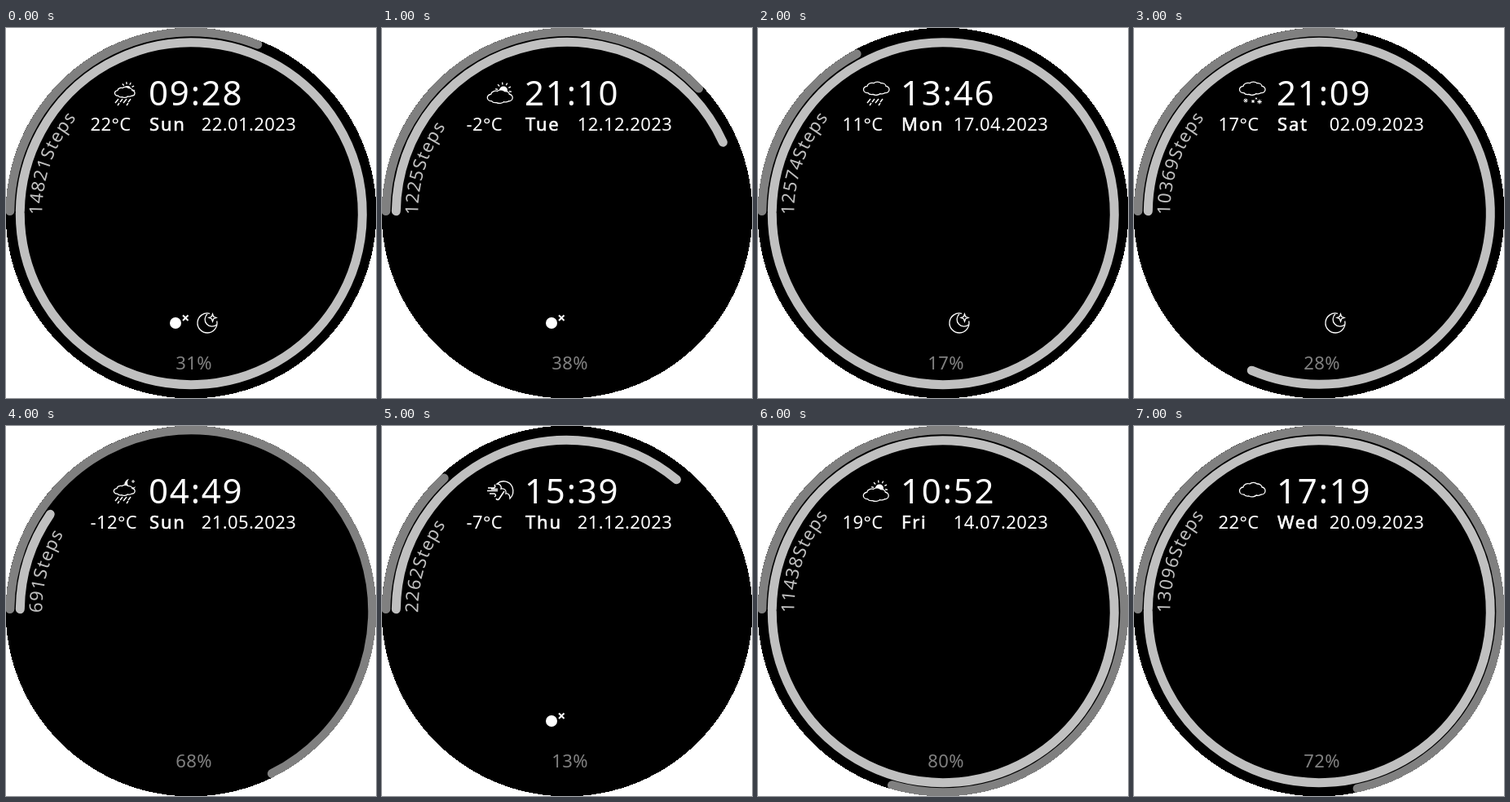
An HTML page that plays this animation: 454x454 px, repeating every 8000 ms.

```html
<!DOCTYPE html>
<html lang="en">
<head>
<meta charset="utf-8">
<title>Watch face</title>
<style>
  html, body { margin: 0; width: 100%; height: 100%; overflow: hidden; background: #fff; }
  svg { display: block; width: 454px; height: 454px; }
  text { font: 22px "Noto Sans", "Open Sans", sans-serif; fill: #fff; letter-spacing: .4px; white-space: pre; }
  #time { font-size: 42px; letter-spacing: 1.8px; }
  #day { letter-spacing: 1.8px; stroke: #fff; stroke-width: .6; }
  #steps { fill: #c0c0c0; letter-spacing: 1px; }
  #charge { fill: #808080; }
  .ring { fill: none; stroke-width: 11; stroke-linecap: round; }
  .icon { fill: none; stroke: #fff; stroke-width: 1.3; }
  .solid { fill: #fff; stroke: none; }
  .mask { fill: #000; }
</style>
</head>
<body>
<svg viewBox="0 0 454 454">
  <defs>
    <path id="curve"/>
    <path id="cloud" d="M135 84a5 4.5 0 0 1-1-9a6 5 0 0 1 8-4a6 5 0 0 1 9 0a6 4 0 0 1 6 4a4.5 4.5 0 0 1-1 9a5 3 0 0 1-6 1a6 4 0 0 1-9 1a5 3 0 0 1-6-2z" vector-effect="non-scaling-stroke"/>
  </defs>
  <rect width="454" height="454"/>
  <path id="outer" class="ring" stroke="#808080"/>
  <path id="inner" class="ring" stroke="#c0c0c0"/>
  <path id="corners" fill="#fff" fill-rule="evenodd" shape-rendering="crispEdges"
    d="M-2-2H456V456H-2zM-.5 227a227.5 227.5 0 0 1 455 0a227.5 227.5 0 0 1-455 0z"/>
  <g id="weather" class="icon"></g>
  <text id="time" x="175" y="95"></text>
  <text id="temp" x="103.5" y="126"></text>
  <text id="day" x="176" y="126"></text>
  <text id="date" x="239.7" y="126"></text>
  <text id="steps"><textPath id="count" href="#curve"></textPath></text>
  <g id="link" class="icon">
    <circle class="solid" cx="208" cy="362" r="7"/>
    <path d="M217 352.5l6.5 6.5m0-6.5l-6.5 6.5" stroke-width="2"/>
  </g>
  <g id="quiet" class="icon">
    <path d="M250 350.4A12 12 0 1 0 258.7 359.5"/>
    <path d="M247 351A8.5 8.5 0 1 0 258.6 364"/>
    <path d="M253.5 351l1.2 3.3l3.3 1.2l-3.3 1.2l-1.2 3.3l-1.2-3.3l-3.3-1.2l3.3-1.2z"/>
  </g>
  <text id="charge" x="208.2" y="419"></text>
</svg>
<script>
const $ = id => document.getElementById(id);
const HOLD = 1000;
const CENTER = 227.3;

// Angles run clockwise from nine o'clock.
function arc(r, from, to) {
  const at = deg => {
    const a = deg * Math.PI / 180;
    return `${(CENTER - r * Math.cos(a)).toFixed(2)} ${(CENTER - r * Math.sin(a)).toFixed(2)}`;
  };
  return `M${at(from)}A${r} ${r} 0 ${to - from > 180 ? 1 : 0} 1 ${at(to)}`;
}

const cloud = (x, y, sx, sy, cls = "") =>
  `<use href="#cloud" class="${cls}" transform="translate(${x} ${y}) scale(${sx} ${sy}) translate(-145 -79)"/>`;
const line = (d, width = 1.3) => `<path d="${d}" stroke-width="${width}"/>`;
const flake = (x, y, r) =>
  line(`M${x - r} ${y}h${2 * r}M${x} ${y - r}v${2 * r}M${x - r * .7} ${y - r * .7}l${r * 1.4} ${r * 1.4}m0 ${-r * 1.4}l${-r * 1.4} ${r * 1.4}`, 1);

function sun(x, y, r) {
  let rays = "";
  for (let deg = 10; deg <= 190; deg += 36) {
    const c = -Math.cos(deg * Math.PI / 180), s = -Math.sin(deg * Math.PI / 180);
    rays += `M${x + c * (r + 2)} ${y + s * (r + 2)}L${x + c * (r + 5)} ${y + s * (r + 5)}`;
  }
  return `<circle class="solid" cx="${x}" cy="${y}" r="${r}"/>` + line(rays);
}

const rain = line("M138 87l-4 5M143 87l-3 4M148 87l-4 5M153 87l-3 4M139 92l-2 3M150 92l-2 3", 1.4);
const moon = '<path class="solid" d="M151 65a7 7 0 1 0 8 9a6 6 0 0 1-8-9z"/>' + line("M156 66v4M154 68h4", 1);

const icons = {
  cloudy: cloud(145, 79, 1, 1),
  snow: cloud(145, 75, 1, .92) + flake(137, 89, 2.6) + flake(146, 90, 2) + flake(154, 90.5, 2.8) + flake(150, 86.5, 1),
  fair: sun(149, 76.5, 5) + cloud(144.5, 85, .98, .94, "mask"),
  showers: sun(149, 75, 4) + cloud(145.5, 79.5, .78, .74, "mask") + rain,
  night: moon + cloud(145, 79.5, .82, .74, "mask") + rain,
  wet: cloud(145, 75, 1, .92) + rain,
  storm: line("M141 71C148 65 157 68 160 75C162 81 160 86 157 89C157 85 155 82 152 83C153 79 150 76 146 77C147 74 145 71 141 71z")
    + line("M150 80l-6 9q-2 3-4 0", 1.6)
    + line("M130 76h7q3-1 1-4M129 79.5h13M132 83h6q3 2 0 4M134 77.5h8", 1.5)
};

const faces = [
  { time: "09:28", temp: "22°C", day: "Sun", date: "22.01.2023", steps: 14821, sweep: 360, charge: 31, sky: "showers", link: 1, quiet: 1 },
  { time: "21:10", temp: "-2°C", day: "Tue", date: "12.12.2023", steps: 1225, sweep: 155.5, charge: 38, sky: "fair", link: 1 },
  { time: "13:46", temp: "11°C", day: "Mon", date: "17.04.2023", steps: 12574, sweep: 360, charge: 17, sky: "wet", quiet: 1 },
  { time: "21:09", temp: "17°C", day: "Sat", date: "02.09.2023", steps: 10369, sweep: 293.3, charge: 28, sky: "snow", quiet: 1 },
  { time: "04:49", temp: "-12°C", day: "Sun", date: "21.05.2023", steps: 691, sweep: 34.5, charge: 68, sky: "night" },
  { time: "15:39", temp: "-7°C", day: "Thu", date: "21.12.2023", steps: 2262, sweep: 129.7, charge: 13, sky: "storm", link: 1 },
  { time: "10:52", temp: "19°C", day: "Fri", date: "14.07.2023", steps: 11438, sweep: 360, charge: 80, sky: "fair" },
  { time: "17:19", temp: "22°C", day: "Wed", date: "20.09.2023", steps: 13096, sweep: 360, charge: 72, sky: "cloudy" }
];

function show(face) {
  for (const key of ["time", "temp", "day", "date"]) $(key).textContent = face[key];
  $("count").textContent = face.steps + "Steps";
  $("charge").textContent = face.charge + "%";
  $("outer").setAttribute("d", arc(222.5, .7, .8 + 3.57 * face.charge));
  $("inner").setAttribute("d", arc(210, .7, face.sweep));
  $("weather").innerHTML = icons[face.sky];
  $("link").style.display = face.link ? "" : "none";
  $("quiet").style.display = face.quiet ? "" : "none";
}

$("curve").setAttribute("d", arc(183, -.6, 90));

const start = performance.now();
let current = -1;
function tick() {
  const next = Math.floor(Math.max(0, performance.now() - start) / HOLD) % faces.length;
  if (next !== current) show(faces[current = next]);
  requestAnimationFrame(tick);
}
tick();
</script>
</body>
</html>
```
